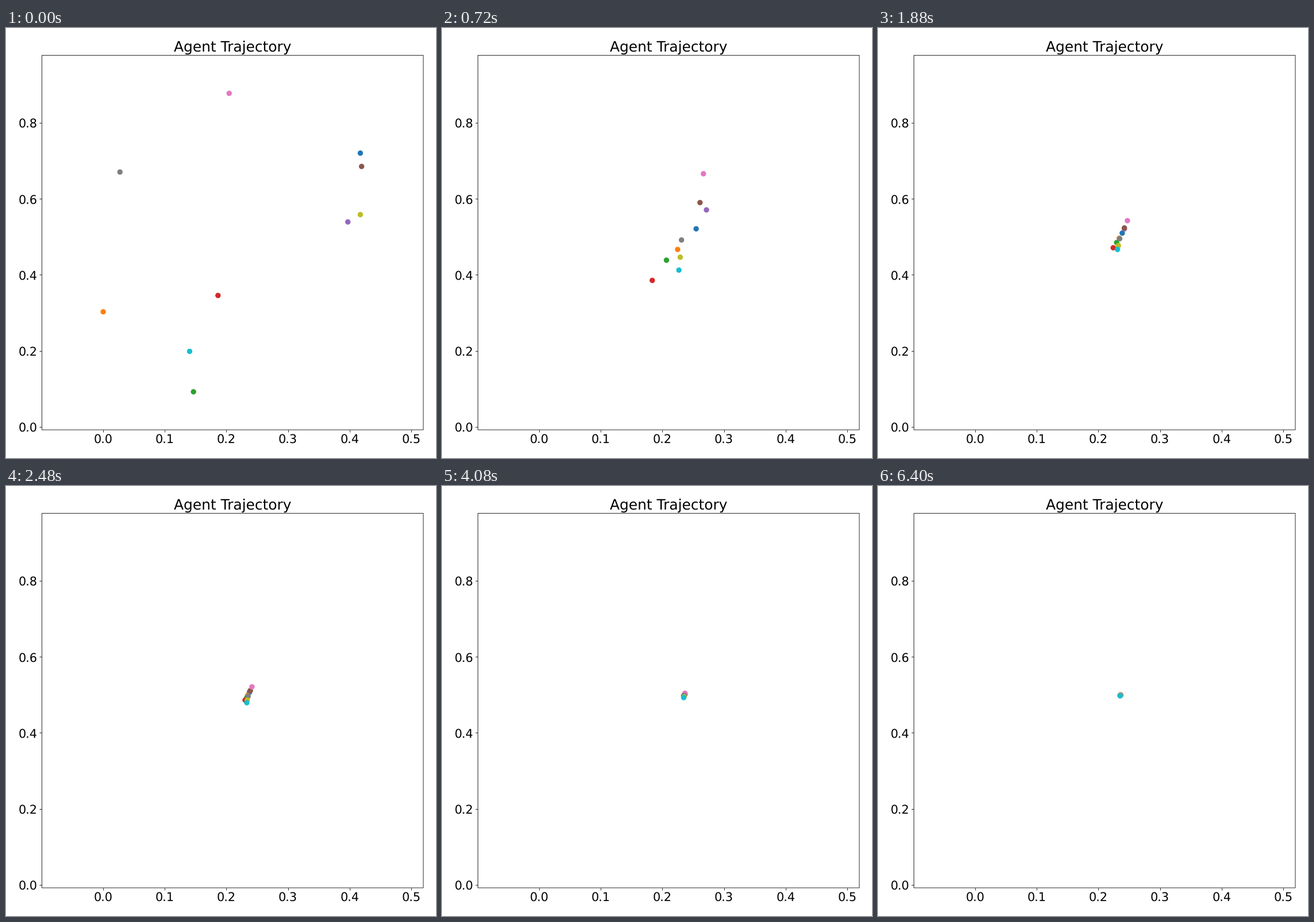
Animation, 748 px wide and 748 px high, one loop 6550 ms. Source, as a matplotlib script:

```python
from itertools import pairwise

import matplotlib.pyplot as plt
import numpy as np
from matplotlib.animation import FuncAnimation
from matplotlib.patches import Rectangle

SIZE = 748
LOOP_MS = 6550
FRAMES = 328
AGENTS = 10
STEPS = 299
SLOW_MS = 2660  # one step per 20 ms up to here, a little slower afterwards
GAIN = 0.05
GRID = 1000  # dots sit on whole cells of a 1000 x 1000 grid

# A ring of six agents with three tails
CHAINS = [(0, 1, 2, 7, 5, 4, 0), (2, 3), (5, 6), (7, 8, 9)]


def laplacian(chains):
    lap = np.zeros((AGENTS, AGENTS))
    for chain in chains:
        for i, j in pairwise(chain):
            lap[[i, j], [i, j]] += 1
            lap[[i, j], [j, i]] -= 1
    return lap


def simulate(start):
    """Consensus: every agent moves towards its neighbours."""
    move = np.eye(AGENTS) - GAIN * laplacian(CHAINS)
    path = [start]
    for _ in range(STEPS):
        path.append(move @ path[-1])
    return path


def step_at(ms):
    if ms < SLOW_MS:
        return ms // 20
    return round(np.interp(ms, [SLOW_MS, LOOP_MS], [SLOW_MS // 20, STEPS]))


def to_grid(points):
    return np.floor(points * GRID + 0.5) / GRID


start = np.random.RandomState(1).rand(AGENTS, 2)
path = simulate(start)

plt.rcParams.update({"font.family": "DejaVu Sans", "font.size": 20,
                     "text.hinting": "no_hinting"})
fig, ax = plt.subplots(figsize=(10, 10), dpi=SIZE / 10)
fig.subplots_adjust(left=0.0829, right=0.970, bottom=0.0657, top=0.9367)

dots = ax.scatter(*start.T, s=64, linewidths=1, zorder=2,
                  c=[f"C{i}" for i in range(AGENTS)],
                  transform=fig.transFigure)
(x0, y0), (x1, y1) = start.min(axis=0) - 0.1, start.max(axis=0) + 0.1
ax.set(xlim=(x0, x1), ylim=(y0, y1), title="Agent Trajectory",
       xticks=np.arange(6) / 10, yticks=np.arange(5) / 5)
to_figure = ax.transData - fig.transFigure

# Frame lines run through the middle of the grid cells
ax.spines[:].set_visible(False)
low, high = to_grid(ax.get_position().get_points()) + np.array([0.5, -0.5]) / GRID
fig.add_artist(Rectangle(low, *(high - low), fill=False, lw=0.8, snap=False))


def update(frame):
    spots = to_figure.transform(path[step_at(frame * 20)])
    dots.set_offsets(to_grid(spots))
    return [dots]


anim = FuncAnimation(fig, update, frames=FRAMES, interval=LOOP_MS / FRAMES,
                     repeat=True, repeat_delay=0, blit=False)
plt.show()
```
